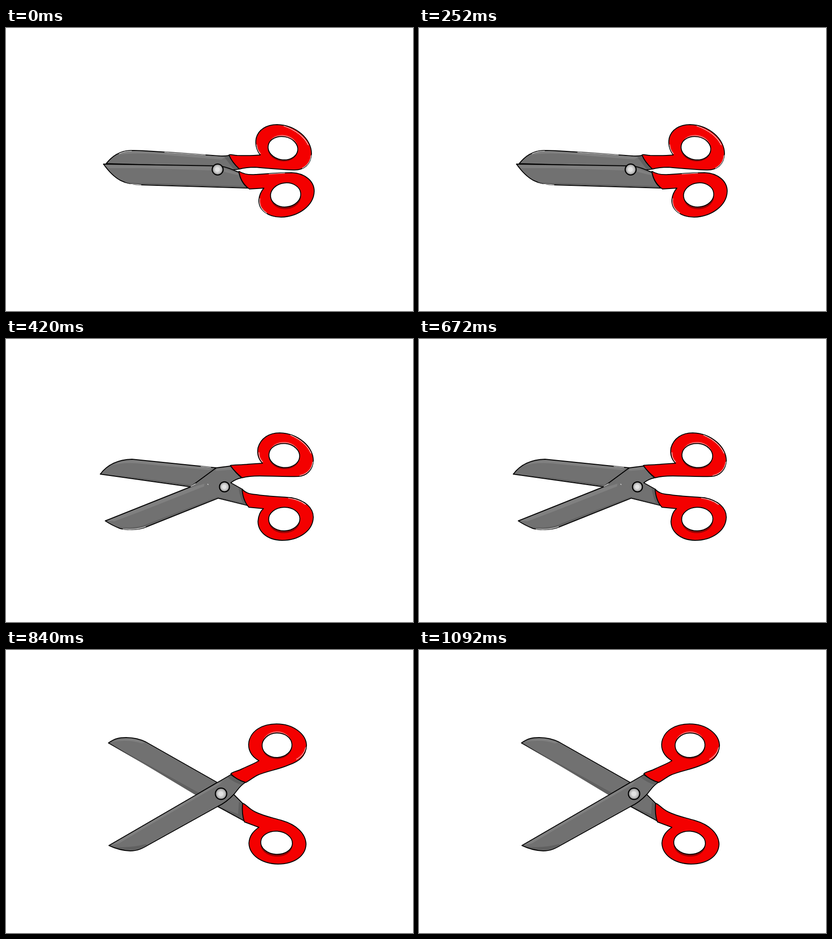
An HTML page for the animation above (1260 ms loop, 898x624 px).

```html
<!DOCTYPE html>
<html lang="en">
<head>
<meta charset="utf-8">
<title>Scissors</title>
<style>
  html, body { margin: 0; width: 100%; height: 100%; overflow: hidden; background: #fff; }
  svg { display: block; width: 898px; height: 624px; }
  .pose { opacity: 0; fill: none; stroke-linejoin: round; stroke-linecap: round; }
  .steel, .grip, .hole, .rivet { stroke: #000; stroke-width: 2; }
  .steel { fill: #717171; }
  .grip { fill: #f40000; }
  .hole { fill: #fff; }
  .rivet { fill: #a9a9a9; stroke-width: 2.5; }
  .light { fill: #808080; }
  .dark { fill: #606060; }
  .glint { stroke: #fff; stroke-width: 1.2; }
</style>
</head>
<body>
<svg id="stage" viewBox="0 0 898 624"></svg>
<script>
const STEP = 420;

// Parts are painted in order: [class, path]. Holes: [cx, cy, rx, ry, angle].
const poses = [
  {
    parts: [
      ['steel', 'M221 299C234 283 250 271 275 270C302 269 330 273 360 274L470 282Q482 283 492 281L515 311L500 313L478 306Z'],
      ['light', 'M246 280Q260 272 285 271L470 283L484 285L475 290L330 278Q275 274 246 280Z'],
      ['dark', 'M482 285L491 283L513 309L502 311Z'],
      ['steel', 'M215 300L470 304C488 306 500 313 514 318C517 333 523 345 534 353L300 346C262 346 240 335 215 300Z'],
      ['light', 'M219 302L455 306L452 314L300 309L226 309Z'],
      ['light', 'M481 310L512 320L514 325L481 317Z'],
      ['dark', 'M262 340Q280 342 310 342L528 349L531 352L300 345Q275 345 262 340Z'],
      ['glint', 'M224 315Q242 340 271 344L298 346M250 277Q262 271 277 271M350 274L440 280'],
      ['grip', 'M492 280C494 278 500 280 510 281Q540 282 561 280C552 268 550 254 552 243C557 224 575 213 598 213C640 214 674 245 674 277C673 300 658 314 634 313C600 312 575 309 550 307Q530 307 515 311C505 302 497 292 492 280Z'],
      ['grip', 'M514 316C522 321 535 324 550 323C580 321 605 319 630 319C660 320 680 338 680 360C679 392 645 416 607 417C578 417 557 401 558 379C559 367 563 360 569 353L537 355C525 346 516 332 514 316Z'],
      ['glint', 'M613 216Q653 230 667 258M673 281Q671 300 654 309M553 257Q554 269 561 277M560 376Q557 396 575 408M580 322L615 320']
    ],
    holes: [[611, 265, 33, 25.5, 10], [617, 368, 33.5, 26.5, -7]],
    rivet: [467, 312, 12]
  },
  {
    parts: [
      ['steel', 'M208 298C220 282 240 266 278 265L464 284L407 326Z'],
      ['light', 'M234 279Q254 268 280 267L456 285L448 289L290 274Q255 272 234 279Z'],
      ['dark', 'M212 297L300 307L410 322L407 325Z'],
      ['steel', 'M219 401L407 326L464 284L496 280Q508 297 520 306Q506 309 496 317L521 331C522 345 526 358 533 367L468 351L308 415C290 422 265 421 252 418Q234 411 219 401Z'],
      ['light', 'M223 401L408 328L438 319L437 325L300 379L239 402Z'],
      ['light', 'M465 286L494 282L499 288L462 291Z'],
      ['dark', 'M247 414Q280 419 306 410L467 348L530 363L531 366L468 350L308 413Q275 422 247 414Z'],
      ['dark', 'M513 328L520 332Q522 350 531 365L524 364Q516 350 513 328Z'],
      ['glint', 'M258 419Q286 422 308 414M408 325L418 319M445 320L446 321M430 281L452 283'],
      ['grip', 'M495 279C500 277 520 278 535 276L566 274C556 264 554 252 556 240C562 219 580 207 604 207C645 208 678 238 678 268C677 288 664 302 645 303C610 304 585 302 560 302Q535 302 521 306C511 298 503 290 495 279Z'],
      ['grip', 'M521 331C528 339 537 342 552 343C575 347 600 347 630 350C660 356 678 372 678 393C677 424 645 444 609 444C575 443 556 424 556 402C557 389 561 380 568 374L536 371C526 360 522 345 521 331Z'],
      ['glint', 'M628 212Q662 227 673 252M677 271Q673 296 648 301M623 351Q647 354 661 365M558 250Q558 263 566 271']
    ],
    holes: [[614, 257, 34, 26.5, 5], [614, 397, 34.5, 26, -2]],
    rivet: [482, 326, 11]
  },
  {
    parts: [
      ['steel', 'M226 205C240 195 250 193 265 193C285 193 297 197 309 203L466 292L422 318Z'],
      ['light', 'M233 203Q258 193 285 197L307 204L300 206Q268 196 233 203Z'],
      ['dark', 'M229 206L422 313L432 316L422 322Z'],
      ['steel', 'M467 345L502 318L522 338Q520 360 526 377Z'],
      ['dark', 'M514 334L521 339Q520 360 524 375L470 345L512 362Z'],
      ['steel', 'M227 431L496 275Q510 285 528 292C515 300 512 308 503 318C490 332 480 339 467 345L312 431C300 438 290 443 274 443Q250 442 227 431Z'],
      ['light', 'M231 431L466 294L478 290L470 297L300 396L250 426Z'],
      ['dark', 'M238 434Q275 437 309 428L312 430Q292 442 274 441Q255 441 238 434Z'],
      ['dark', 'M489 281L496 277Q511 287 525 292L519 297Q503 292 489 281Z'],
      ['grip', 'M496 273C500 268 510 268 521 262C535 255 548 251 558 244C540 234 533 218 536 202C541 178 565 163 597 163C635 163 662 186 663 210C662 235 645 246 625 253C600 264 575 267 555 276C545 281 537 288 529 292Q508 286 496 273Z'],
      ['grip', 'M522 338C530 340 535 350 550 357C570 367 590 370 609 376C640 385 661 404 662 428C661 455 635 472 600 472C563 471 537 452 536 426C537 410 545 400 558 391L526 379C521 365 521 350 522 338Z'],
      ['glint', 'M661 215Q658 231 641 241M537 194Q541 183 549 177']
    ],
    holes: [[598, 210, 33, 27, -3], [597, 425, 35, 25.5, 4]],
    rivet: [474.5, 317, 12.5]
  }
];

const path = ([name, d]) => `<path class="${name}" d="${d}"/>`;

const ellipse = (rx, ry, dy, attrs) => `<ellipse cy="${dy}" rx="${rx}" ry="${ry}" ${attrs}/>`;

const hole = ([x, y, rx, ry, angle], i) =>
  `<g transform="translate(${x} ${y}) rotate(${angle})">` +
  ellipse(rx, ry, i ? 5 : 3.5, 'fill="#960000"') +
  (i ? '' : ellipse(rx - 1, ry, -3.5, 'fill="#ff7070"')) +
  ellipse(rx, ry, 0, 'class="hole"') + '</g>';

const rivet = ([x, y, r]) =>
  `<circle class="rivet" cx="${x}" cy="${y}" r="${r}"/>` +
  `<circle cx="${x}" cy="${y}" r="${r * 0.7}" fill="#c9c9c9"/>` +
  `<circle cx="${x - 0.5}" cy="${y}" r="${r * 0.45}" fill="#e2e2e2"/>`;

const stage = document.getElementById('stage');
stage.innerHTML = poses.map(p =>
  `<g class="pose">${p.parts.map(path).join('')}${p.holes.map(hole).join('')}${rivet(p.rivet)}</g>`
).join('');

[...stage.children].forEach((group, i) => {
  const shown = poses.map((_, k) => Number(k === i));
  group.animate(
    { opacity: [...shown, shown[shown.length - 1]], easing: 'steps(1, end)' },
    { duration: STEP * poses.length, iterations: Infinity }
  );
});
</script>
</body>
</html>
```
